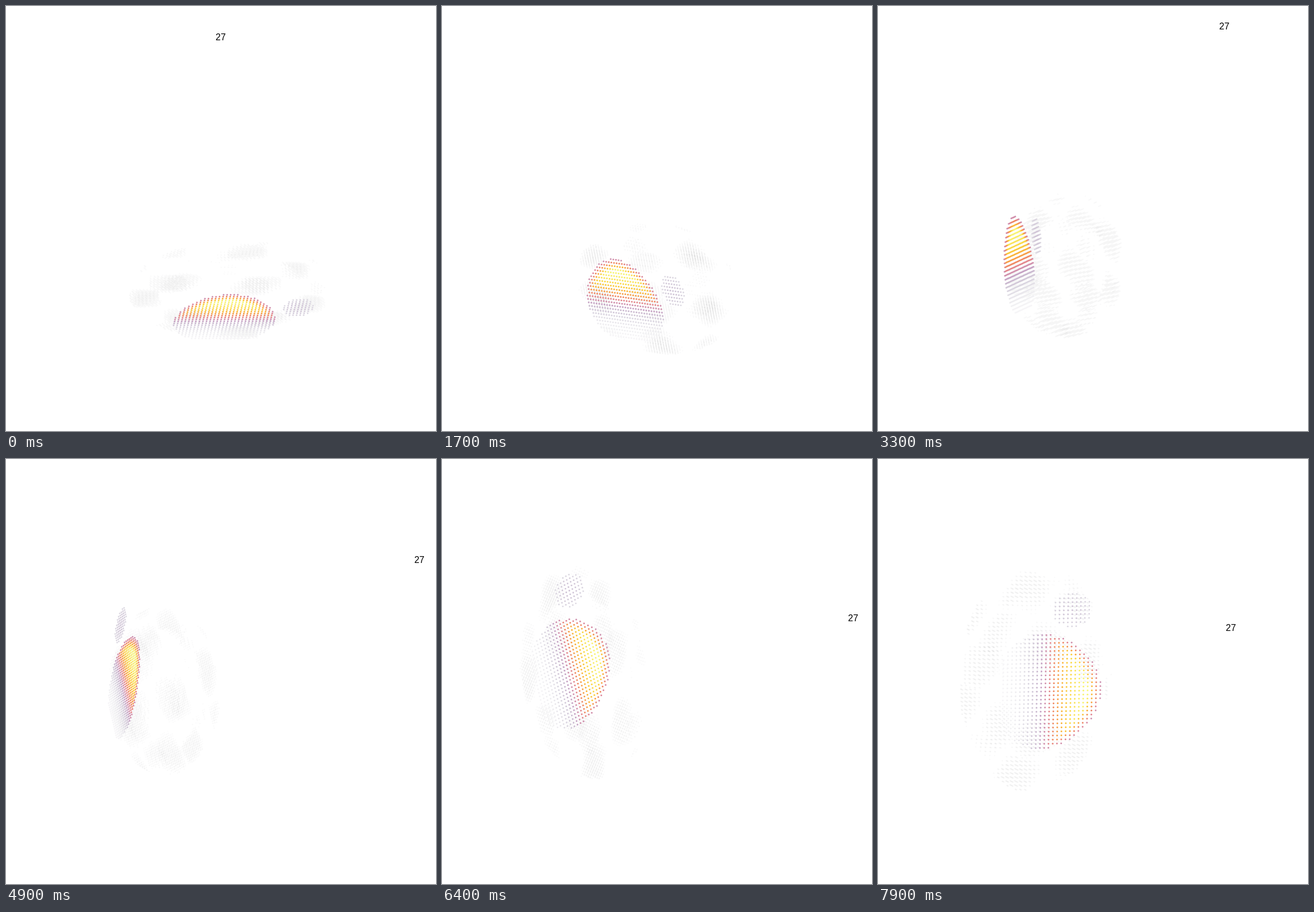
An HTML page with a canvas for the animation above (8 s loop, 753x744 px).

```html
<!DOCTYPE html>
<html>
<head>
<meta charset="utf-8">
<style>
html, body { margin: 0; width: 100%; height: 100%; overflow: hidden; background: #fff; }
canvas { display: block; }
</style>
</head>
<body>
<canvas id="stage" width="753" height="744"></canvas>
<script>
const ctx = document.getElementById('stage').getContext('2d');
const LOOP = 8000, STEP = 100, TURN = 28.1 * Math.PI / 180; // radians per second

// paths as [seconds, x, y]
const CENTRE = [[0, 387, 532], [1.7, 314, 492], [3.3, 243, 426], [5.7, 226, 359], [7.9, 330, 406]];
const LABEL = [[0, 376, 54], [1.7, 460, -30], [3.3, 606.5, 35], [5.7, 738, 240], [7, 685, 295], [7.9, 618, 295]];

const COLORS = ['fafafa', 'dedbe3', 'cbbdd2', 'c49abf', 'de869a', 'ef8762', 'faa838', 'fad038', 'f8f87a']
  .map(hex => [0, 2, 4].map(n => parseInt(hex.slice(n, n + 2), 16)));

// smooth polynomial through all points of a path
function along(path, t) {
  let x = 0, y = 0;
  for (const p of path) {
    let w = 1;
    for (const q of path) if (q !== p) w *= (t - q[0]) / (p[0] - q[0]);
    x += w * p[1];
    y += w * p[2];
  }
  return [x, y];
}

function heat(v) {
  const pos = Math.max(0, Math.min(1, v)) * (COLORS.length - 1);
  const n = Math.min(COLORS.length - 2, Math.floor(pos));
  const mix = COLORS[n].map((c, m) => Math.round(c + (COLORS[n + 1][m] - c) * (pos - n)));
  return `rgb(${mix})`;
}

const dots = [];

// visits the lattice points of an ellipsoid, with their relative distance from its centre
function fillEllipsoid([ci, cj, ck], [ri, rj, rk], visit) {
  for (let k = Math.ceil(ck - rk); k <= ck + rk; k++)
    for (let j = Math.ceil(cj - rj); j <= cj + rj; j++)
      for (let i = Math.ceil(ci - ri); i <= ci + ri; i++) {
        const q = Math.hypot((i - ci) / ri, (j - cj) / rj, (k - ck) / rk);
        if (q <= 1) visit(i, j, k, q);
      }
}

// thin folded tissue near the outer surface
function addShell() {
  fillEllipsoid([3, 11, 11], [18, 29, 13], (i, j, k, q) => {
    const fold = Math.sin(0.5 * i + 0.2 * k) + Math.sin(0.3 * j - 0.35 * k + 1)
      + Math.sin(0.25 * (i + j) + 0.5 * k);
    if (q < 0.72 || fold < 1.1) return;
    const alpha = 0.03 * Math.min(1, fold - 0.6);
    dots.push({ i, j, k, r: 1.3, color: `rgba(20,20,30,${alpha.toFixed(3)})` });
  });
}

function addPatch() {
  fillEllipsoid([10, -6, 0], [4.8, 4.4, 1], (i, j, k, q) => {
    if (k === 0) dots.push({ i, j, k, r: 1.45, color: heat(0.23 - 0.11 * q * q) });
  });
}

function addDome() {
  for (let j = 0; j <= 28; j++)
    for (let i = -6; i <= 17; i++) {
      const side = Math.abs(i - 3) / (i > 3 ? 14.3 : 12);
      const q = Math.pow(side ** 1.85 + (Math.abs(j - 14) / 14.4) ** 1.85, 1 / 1.85);
      if (q > 1) continue;
      const rim = 0.4 + 2.6 * (1 - q);
      const ramp = 1.03 / (1 + Math.exp((4.8 - i) / 2.7));
      dots.push({ i, j, k: 0, r: 1.5, color: heat(Math.min(rim, ramp)) });
    }
}

addShell();
addPatch();
addDome();

function draw(t) {
  ctx.fillStyle = '#fff';
  ctx.fillRect(0, 0, 753, 744);

  // each lattice axis traces an ellipse on screen as the model turns
  const a = TURN * t, c = Math.cos(a), s = Math.sin(a);
  const scale = 6.75 - 0.55 * Math.cos(a - 0.14);
  const swing = (base, cosPart, sinPart) => scale * (base + cosPart * c + sinPart * s);
  const ix = swing(0.43, -0.3, -0.56), iy = swing(-0.465, -0.07, -0.58);
  const jx = swing(-0.397, -0.604, 0.107), jy = swing(0.435, -0.43, -0.335);
  const kx = swing(0.197, -0.287, 0.82), ky = swing(-0.321, -0.479, 0.156);
  const [cx, cy] = along(CENTRE, t);

  for (const { i, j, k, r, color } of dots) {
    const x = cx + (i - 9) * ix + (j - 14) * jx + k * kx;
    const y = cy + (i - 9) * iy + (j - 14) * jy + k * ky;
    ctx.fillStyle = color;
    ctx.beginPath();
    ctx.arc(x, y, r, 0, 2 * Math.PI);
    ctx.fill();
  }

  const [lx, ly] = along(LABEL, t);
  ctx.fillStyle = '#000';
  ctx.font = '16px "Liberation Sans", sans-serif';
  ctx.textAlign = 'center';
  ctx.fillText('27', lx, ly + 5.5);
}

const start = performance.now();
function tick() {
  const t = (performance.now() - start) % LOOP;
  draw(Math.floor(t / STEP) * STEP / 1000);
  requestAnimationFrame(tick);
}
tick();
</script>
</body>
</html>
```
